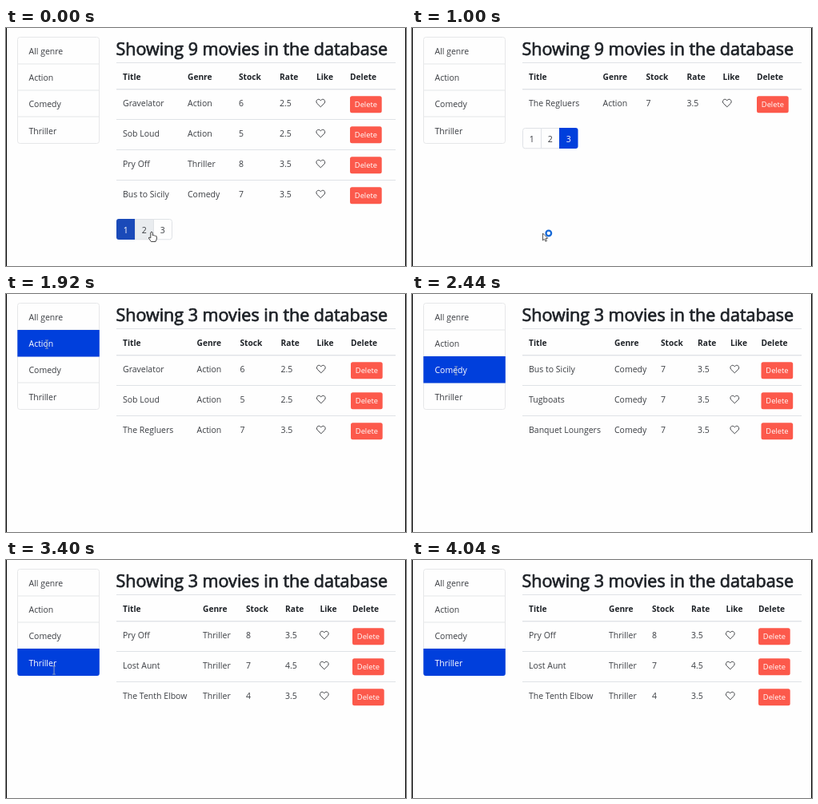
Write an HTML page with a canvas that moves like this. It is 500 by 298 pixels and loops after 4.48 s.

```html
<!DOCTYPE html>
<html lang="en">
<head>
<meta charset="utf-8">
<title>Movie list</title>
<style>
html, body { margin: 0; width: 100%; height: 100%; overflow: hidden; background: #fefefe; }
canvas { display: block; }
</style>
</head>
<body>
<canvas id="stage" width="500" height="298"></canvas>
<script>
const ctx = document.getElementById('stage').getContext('2d');
const LOOP = 4480, STEP = 40;
const FONT = '"Open Sans", "Noto Sans", sans-serif';
const BLUE = '#003fdc', DULL_BLUE = '#1a4ab9', RED = '#fc594b';
const LINE = '#dfe2e6', SOFT_LINE = '#e6e7e9', HOVER = '#e9ecef', INK = '#3a3d42', DARK = '#1f2328';

const genres = ['All genre', 'Action', 'Comedy', 'Thriller'];
const itemTops = [11.5, 45, 78, 111, 144.5];
const headers = ['Title', 'Genre', 'Stock', 'Rate', 'Like', 'Delete'];

const movies = [
  ['Gravelator', 'Action', 6, 2.5],
  ['Sob Loud', 'Action', 5, 2.5],
  ['Pry Off', 'Thriller', 8, 3.5],
  ['Bus to Sicily', 'Comedy', 7, 3.5],
  ['Tugboats', 'Comedy', 7, 3.5],
  ['Banquet Loungers', 'Comedy', 7, 3.5],
  ['Lost Aunt', 'Thriller', 7, 4.5],
  ['The Tenth Elbow', 'Thriller', 4, 3.5],
  ['The Regluers', 'Action', 7, 3.5]
];

// Column starts depend on the widest title in the view.
const narrow = [146, 227, 291, 342, 388, 430];
const medium = [146, 238.5, 292.5, 343.5, 388.5, 431];
const large = [146, 246, 300, 349, 392.5, 433];
const wide = [146, 253, 311, 357, 398, 436.5];

const views = [
  { start: 0, page: 1, cols: narrow },
  { start: 200, page: 2, cols: wide },
  { start: 720, page: 3, cols: medium },
  { start: 1920, genre: 1, cols: medium },
  { start: 2440, genre: 2, cols: wide },
  { start: 3320, genre: 3, cols: large }
];

// Pointer hot spot: time, x, y
const pointerPath = [
  [0, 182, 255], [280, 182, 255], [520, 198, 251], [760, 198, 251],
  [1000, 163.5, 257], [1120, 160, 250], [1760, 51, 63], [2040, 51, 63],
  [2360, 55, 96], [2600, 55, 96], [2840, 54, 111], [3120, 60, 138],
  [3640, 60, 138], [4040, 72, 312], [LOOP, 72, 312]
];

const heart = new Path2D('M0 5 L-4.6 .5 C-7 -2.2 -3.4 -7 0 -3 C3.4 -7 7 -2.2 4.6 .5 Z');
const arrow = new Path2D('M0 0 L0 9 L2 7.1 L3.5 10.3 L4.9 9.6 L3.5 6.5 L6.2 6.3 Z');
const hand = new Path2D('M-1.2 7 V1 Q0 -1 1.2 1 V4.6 Q2.4 3.8 3.2 5 Q4.5 4.4 5 5.6 Q6.4 5.2 6.4 6.8 V9 L5 12.5 H-.6 L-3.7 8 Q-3.6 6 -1.2 8 Z');

function text(value, x, y, size = 10.5, color = INK, weight = 400, align = 'left') {
  ctx.font = `${weight} ${size}px ${FONT}`;
  ctx.fillStyle = color;
  ctx.textAlign = align;
  ctx.fillText(value, x, y);
}

function rect(x, y, w, h, color) {
  ctx.fillStyle = color;
  ctx.fillRect(x, y, w, h);
}

function box(x, y, w, h, radius, fill, stroke) {
  ctx.beginPath();
  ctx.roundRect(x, y, w, h, radius);
  if (fill) { ctx.fillStyle = fill; ctx.fill(); }
  if (stroke) { ctx.strokeStyle = stroke; ctx.lineWidth = 1; ctx.stroke(); }
}

function shape(path, x, y, stroke, fill, width = 1) {
  ctx.save();
  ctx.translate(x, y);
  if (fill) { ctx.fillStyle = fill; ctx.fill(path); }
  ctx.strokeStyle = stroke;
  ctx.lineWidth = width;
  ctx.lineJoin = 'round';
  ctx.stroke(path);
  ctx.restore();
}

function pointerAt(t) {
  const i = pointerPath.findIndex(p => p[0] > t);
  const [t0, x0, y0] = pointerPath[i - 1];
  const [t1, x1, y1] = pointerPath[i];
  const u = (t - t0) / (t1 - t0), k = u * u * (3 - 2 * u);
  return { x: x0 + (x1 - x0) * k, y: y0 + (y1 - y0) * k };
}

// A thin outline gives the heading its medium weight.
function drawHeading(count) {
  const title = `Showing ${count} movies in the database`;
  text(title, 137.4, 33.6, 21.5, DARK);
  ctx.strokeStyle = DARK;
  ctx.lineWidth = 0.75;
  ctx.lineJoin = 'round';
  ctx.strokeText(title, 137.4, 33.6);
}

function drawSidebar(active) {
  box(14.5, 11.5, 102, 133, 3, null, SOFT_LINE);
  for (let i = 1; i < 4; i++) rect(15, itemTops[i] - 0.5, 101, 1, SOFT_LINE);
  if (active) {
    const top = itemTops[active];
    box(14.3, top, 102.5, itemTops[active + 1] + 0.5 - top, active === 3 ? [0, 0, 3, 3] : 0, BLUE);
  }
  genres.forEach((name, i) =>
    text(name, 28.5, 33 + i * 33.2, 10.5, i === active ? '#fff' : INK));
}

function drawTable(rows, cols) {
  rect(138, 43, 349, 1, LINE);
  rect(138, 76, 349, 1.4, LINE);
  headers.forEach((name, i) => text(name, cols[i], 64.5, 10.2, DARK, 700));
  rows.forEach((row, r) => {
    const y = 98 + r * 38;
    if (r) rect(138, y - 22, 349, 1, LINE);
    row.forEach((value, i) => text(i === 3 ? value.toFixed(1) : value, cols[i], y));
    shape(heart, cols[4] + 5.3, y - 4.2, '#3a3d41', null, 0.95);
    box(cols[5], y - 12.8, 39.7, 21, 2.5, RED);
    text('Delete', cols[5] + 19.9, y + 1, 9.3, '#fff', 400, 'center');
  });
}

function drawPages(page, top, hovered) {
  for (let i = 1; i <= 3; i++) {
    const x = 115 + i * 23;
    const corners = i === 1 ? [3, 0, 0, 3] : i === 3 ? [0, 3, 3, 0] : 0;
    const on = i === page;
    if (on) box(x, top, 23.5, 26, corners, page === 1 ? DULL_BLUE : BLUE);
    else box(x + 0.5, top + 0.5, 23, 25.3, corners, i === hovered ? HOVER : '#fefefe', LINE);
    text(i, x + 11.8, top + 17.5, 10.5, on ? '#fff' : INK, 400, 'center');
  }
}

function drawPointer(t, { x, y }, overPages, activeGenre) {
  const item = genres.findIndex((_, i) => Math.abs(y - 29 - i * 33.3) < 10);
  if (overPages) {
    shape(hand, x, y, '#333', '#fff', 0.9);
  } else if (item >= 0 && x > 28 && x < 72) {
    const color = item === activeGenre ? '#a3adc0' : '#444';
    rect(x - 0.4, y - 5, 0.9, 10, color);
    rect(x - 2, y - 5.5, 4, 0.8, color);
    rect(x - 2, y + 4.7, 4, 0.8, color);
  } else {
    shape(arrow, x, y, '#444', '#fff', 0.9);
    if (t >= 880 && t < 1160) {
      ctx.beginPath();
      ctx.arc(x + 7.3, y, 3.3, 0, Math.PI * 2);
      ctx.strokeStyle = '#1769d6';
      ctx.lineWidth = 2.3;
      ctx.stroke();
    }
  }
}

function draw(t) {
  const view = views.findLast(v => t >= v.start);
  const { page, genre, cols } = view;
  const found = genre ? movies.filter(m => m[1] === genres[genre]) : movies;
  const rows = page ? found.slice(page * 4 - 4, page * 4) : found;
  const pointer = pointerAt(t);
  const pagesTop = 87 + rows.length * 38;
  const overPages = !!page && pointer.x > 138 && pointer.x < 208 &&
    pointer.y > pagesTop && pointer.y < pagesTop + 26;

  rect(0, 0, 500, 298, '#fefefe');
  drawHeading(found.length);
  drawSidebar(genre);
  drawTable(rows, cols);
  if (page) drawPages(page, pagesTop, overPages ? Math.floor((pointer.x - 115) / 23) : 0);
  drawPointer(t, pointer, overPages, genre);
  rect(0, 0, 1, 298, '#000');
  rect(499, 0, 1, 298, '#000');
}

const begin = performance.now();
function tick() {
  const t = (performance.now() - begin) % LOOP;
  draw(Math.floor(t / STEP) * STEP);
  requestAnimationFrame(tick);
}
tick();
</script>
</body>
</html>
```
